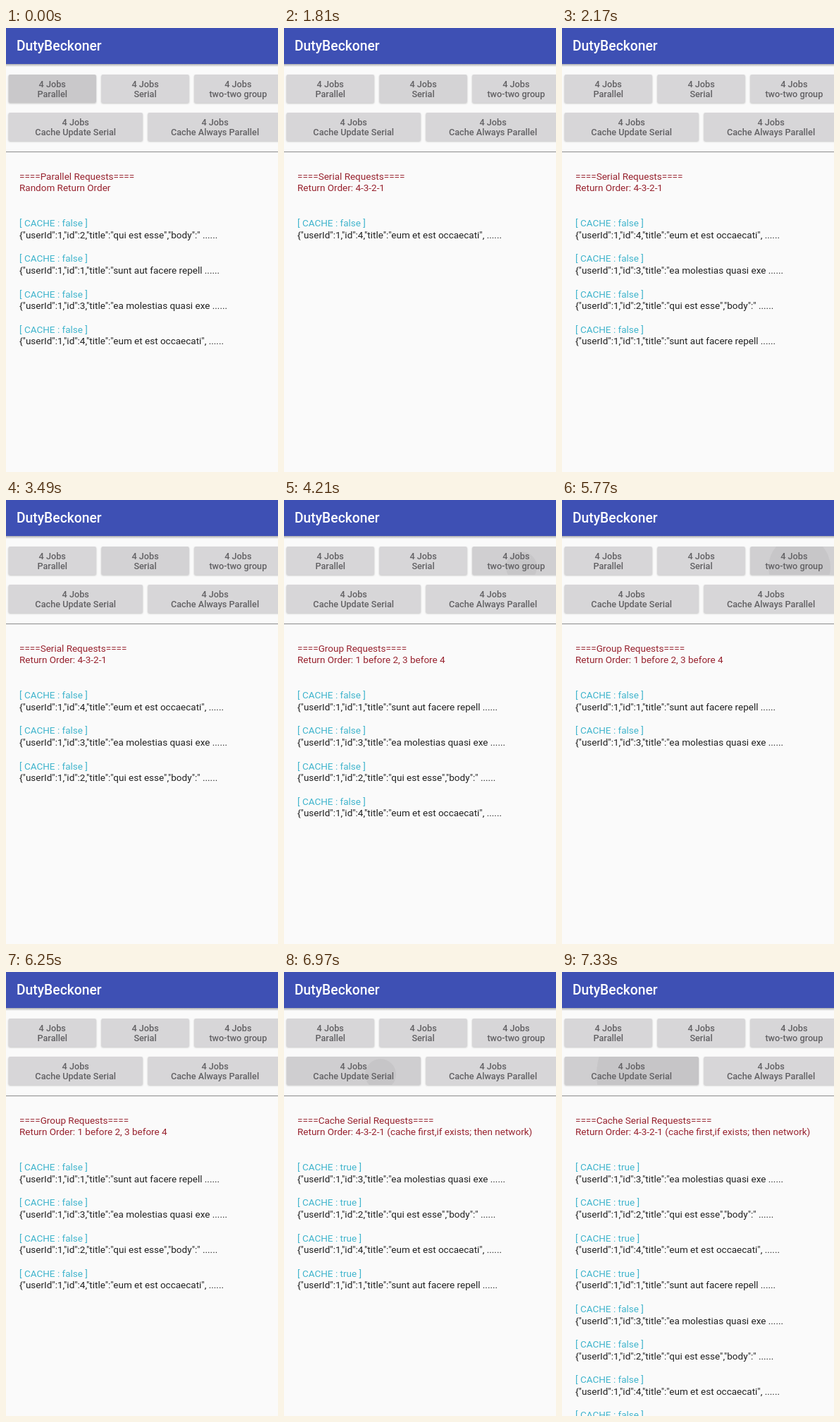
Recreate the animation shown at these times as an HTML page. Size 386x629 px, loop 8 s.

```html
<!DOCTYPE html>
<html lang="en">
<head>
<meta charset="utf-8">
<title>Job list</title>
<style>
html, body { margin: 0; width: 100%; height: 100%; overflow: hidden; background: #fafafa; }
svg { display: block; width: 386px; height: 629px; font-family: Roboto, "Noto Sans", sans-serif; }
.title { font-size: 19.3px; font-weight: 500; fill: #fff; }
.label { font-size: 12.7px; font-weight: 500; fill: #626164; text-anchor: middle; }
#log { font-size: 13.5px; fill: #212121; }
#log .head { fill: #98232f; }
#log .cache { fill: #41b5cd; }
.btn { fill: #d7d6d8; filter: drop-shadow(0 1px 1px rgba(0, 0, 0, .22)); }
</style>
</head>
<body>
<svg viewBox="0 0 386 629">
  <defs>
    <linearGradient id="shadow" x2="0" y2="1">
      <stop stop-color="#000" stop-opacity=".3"/>
      <stop offset="1" stop-color="#000" stop-opacity="0"/>
    </linearGradient>
  </defs>
  <rect y="51" width="386" height="4" fill="url(#shadow)"/>
  <rect width="386" height="51" fill="#3e50b4"/>
  <text class="title" x="15" y="31.5">DutyBeckoner</text>
  <g id="buttons"></g>
  <rect y="175" width="386" height="1" fill="#8c8c8c"/>
  <g id="log"></g>
</svg>
<script>
const LOOP = 8000, TICK = 120;

const ROWS = [
  { y: 66, w: 124.5, names: ['Parallel', 'Serial', 'two-two group'] },
  { y: 120, w: 190.5, names: ['Cache Update Serial', 'Cache Always Parallel'] }
];

const BODIES = {
  1: 'sunt aut facere repell ......',
  2: 'qui est esse","body":" ......',
  3: 'ea molestias quasi exe ......',
  4: 'eum et est occaecati", ......'
};

const LOGS = [
  { name: 'Parallel', note: 'Random Return Order', ids: '2134' },
  { name: 'Serial', note: 'Return Order: 4-3-2-1', ids: '4321' },
  { name: 'Group', note: 'Return Order: 1 before 2, 3 before 4', ids: '1324' },
  { name: 'Cache Serial', note: 'Return Order: 4-3-2-1 (cache first,if exists; then network)', ids: '32413241', cached: true }
];

// start, log, entries at start; one more arrives each tick until the list is full
const PHASES = [
  [0, 0, 4],
  [1810, 1, 1],
  [2890, 1, 1, 'wait'],
  [3490, 1, 3],
  [4090, 2, 4],
  [5650, 2, 1],
  [5890, 2, 4],
  [6970, 3, 4],
  [7330, 3, 8]
];

// button, start, end, shade, ripple center
const PRESSES = [
  [0, 0, 240, .065],
  [1, 1330, 2170, .015],
  [1, 2890, 3610, .02],
  [2, 4090, 4810, .03, 337, 95],
  [2, 5530, 6250, .03, 337, 95],
  [3, 6850, LOOP, .035, 137, 145]
];

const $ = id => document.getElementById(id);
const text = (x, y, s, cls = '') => `<text class="${cls}" x="${x}" y="${y}">${s}</text>`;

let count = 0;
$('buttons').innerHTML = ROWS.map(({ y, w, names }) => names.map((name, col) => {
  const i = count++, x = 3.5 + col * (w + 7.3), mid = x + w / 2;
  const box = `x="${x}" y="${y}" width="${w}" height="40" rx="2"`;
  return `<clipPath id="clip${i}"><rect ${box}/></clipPath>
    <rect class="btn" ${box}/>
    <g clip-path="url(#clip${i})">
      <rect id="shade${i}" ${box} opacity="0"/>
      <circle id="wave${i}" r="0" opacity=".045"/>
    </g>` + text(mid, y + 17.5, '4 Jobs', 'label') + text(mid, y + 32.3, name, 'label');
}).join('')).join('');

function drawLog({ name, note, ids, cached }, shown) {
  let out = text(19, 214.5, `====${name} Requests====`, 'head') + text(19, 231.2, note, 'head');
  [...ids].slice(0, shown).forEach((id, i) => {
    const y = 281.2 + i * 50.15;
    out += text(19, y, `[ CACHE : ${Boolean(cached && i < 4)} ]`, 'cache') +
      text(19, y + 16.8, `{"userId":1,"id":${id},"title":"${BODIES[id]}`);
  });
  $('log').innerHTML = out;
}

function drawPresses(now) {
  for (let i = 0; i < count; i++) {
    const press = PRESSES.find(([b, from, to]) => b === i && now >= from && now < to);
    const [, from, , shade, cx, cy] = press || [];
    $('shade' + i).setAttribute('opacity', press ? shade : 0);
    const wave = $('wave' + i);
    const age = Math.min(4, Math.floor((now - from) / TICK));
    wave.setAttribute('r', cx ? age * 22 : 0);
    if (cx) {
      wave.setAttribute('cx', cx);
      wave.setAttribute('cy', cy);
    }
  }
}

let last;
function tick() {
  const now = performance.now() % LOOP;
  const [start, id, first, wait] = PHASES.findLast(p => p[0] <= now);
  const extra = wait ? 0 : Math.floor((now - start) / TICK);
  const shown = Math.min(LOGS[id].ids.length, first + extra);
  const key = id + ':' + shown;
  if (key !== last) drawLog(LOGS[id], shown);
  last = key;
  drawPresses(now);
  requestAnimationFrame(tick);
}
tick();
</script>
</body>
</html>
```
